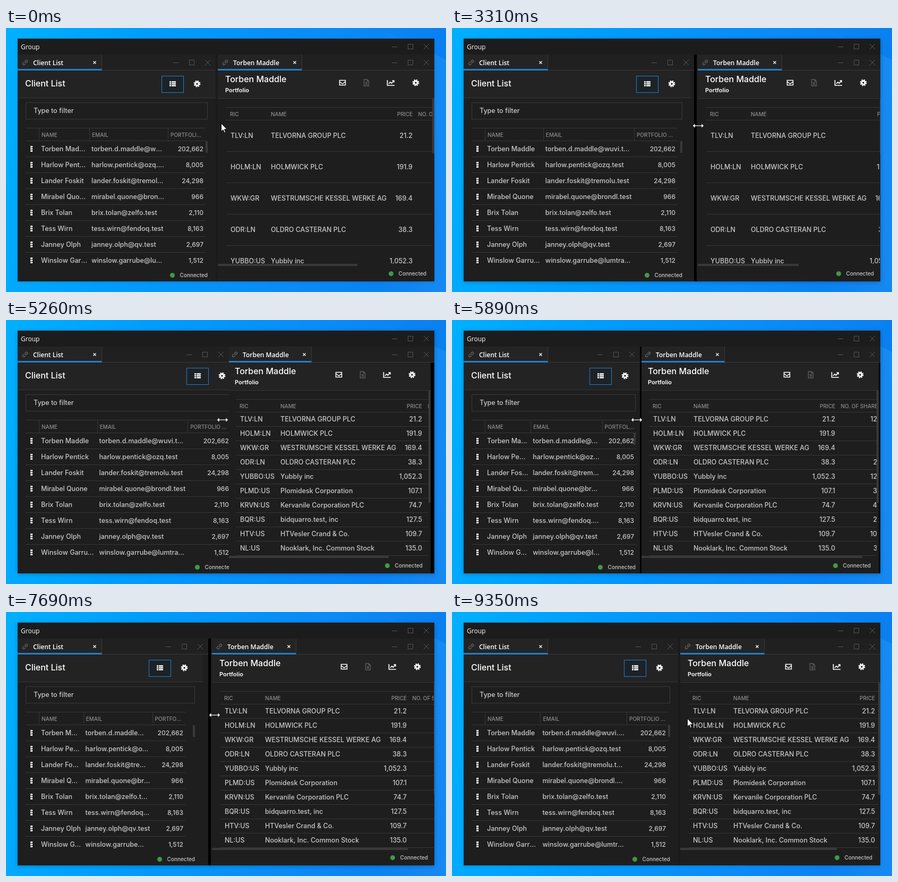
An HTML page that plays this animation: 829x497 px, repeating every 9.75 s.

```html
<!DOCTYPE html>
<html lang="en">
<head>
<meta charset="utf-8">
<title>Resizable panes</title>
<style>
html, body { margin: 0; width: 100%; height: 100%; overflow: hidden; }
body { position: relative; background: linear-gradient(100deg, #00b0ff, #009dfc 30%, #0a8cf7 65%, #0a7cee); font: 500 12.5px Inter, sans-serif; color: #c9c9c9; }
div, svg, span.t { position: absolute; }
svg { overflow: visible; width: 1px; height: 1px; fill: none; stroke: #fff; }
.t { line-height: 20px; white-space: pre; }
.ui { font: 12px/20px "Open Sans", sans-serif; color: #fff; }
.b { font-weight: 600; }
.small { font-size: 10px; }
.head { font-size: 10px; color: #8d8d8d; }
.title { font-size: 16px; color: #fff; }
.sub { font-size: 11px; color: #fff; }
.num { font-size: 12px; text-align: right; }
#glow { right: 0; top: 0; width: 130px; height: 100%; background: linear-gradient(90deg, transparent, #2a9cf866); clip-path: polygon(0 0, 100% 12%, 100% 100%, 0 100%); }
#win { left: 22px; top: 20px; width: 785px; height: 457px; overflow: hidden; background: #1b1b1b; }
#layer { left: -22px; top: -20px; width: 829px; height: 497px; }
#group { left: 0; top: 20px; width: 829px; height: 30px; background: #1c1c1c; z-index: 1; }
.pane { top: 0; height: 477px; overflow: hidden; }
.bar { top: 50px; left: 0; right: 0; height: 29px; background: #202020; border-bottom: 1px solid #383838; }
.body { top: 80px; left: 0; right: 0; bottom: 0; background: #1e1e1e; }
.tab { top: 50px; width: 158px; height: 27px; background: #242424; border-right: 1px solid #383838; border-bottom: 3px solid #1f80d0; }
.top { top: 80px; left: 0; right: 0; background: #232323; border-bottom: 1px solid #363636; }
.filter { left: 37px; right: 15px; top: 140px; height: 30px; border: 1px solid #3b3b3b; }
.btn { right: 60px; top: 90px; width: 40px; height: 30px; border: 1px solid #1f80d0; background: #1d2226; }
.dot { width: 9px; height: 9px; border-radius: 50%; background: #3f9a45; }
.scroll { background: #393939; }
#left { left: 0; }
#leftBody { left: 0; top: 0; height: 477px; }
#clients { left: 37px; top: 188px; height: 262px; overflow: hidden; }
.row { position: static; box-sizing: border-box; height: 30px; line-height: 29px; border-bottom: 1px solid #363636; display: grid; grid-template-columns: 25px minmax(0, 30.25fr) minmax(0, 47.1fr) minmax(0, 22.6fr); }
.row > * { position: relative; overflow: hidden; text-overflow: ellipsis; white-space: nowrap; padding: 0 4px; }
.row.head { height: 25px; line-height: 24px; border-top: 1px solid #363636; }
.row.head > * + * { border-left: 1px solid #363636; }
.row i { margin: 9px 0 0 9px; padding: 0; width: 4px; height: 11px; background: repeating-linear-gradient(#fff 0 3px, transparent 3px 4px); }
#right { background: #000; }
#rightBody { top: 0; height: 477px; box-shadow: -4px 0 #1e1e1e; }
#holder { left: 0; right: 4px; height: 311px; overflow: hidden; }
#shares { left: 16px; top: 16px; width: 456px; }
.share { position: relative; border-bottom: 1px solid #363636; box-sizing: border-box; }
.share span { position: absolute; top: 50%; margin-top: -10px; line-height: 20px; white-space: pre; }
.share.head { height: 25px; border-top: 1px solid #363636; }
</style>
</head>
<body>
<div id="glow"></div>
<div id="win"><div id="layer">
  <div id="group"></div>
  <div id="left" class="pane"></div>
  <div id="right" class="pane"></div>
</div></div>
<svg id="cursor" style="stroke:#000;fill:#fff"><path></path></svg>
<script>
const $ = id => document.getElementById(id);
const text = (x, y, s, cls = '', side = 'left') =>
  `<span class="t ${cls}" style="${side}:${x}px;top:${y - 10}px">${s}</span>`;
const svg = (x, y, inner, side = 'left') =>
  `<svg style="${side}:${side === 'right' ? x - 1 : x}px;top:${y}px">${inner}</svg>`;
const path = (d, extra = '') => `<path d="${d}" ${extra}/>`;

const icons = {
  gear: '<circle r="3.2" stroke-width="3"/><circle r="5.4" stroke-width="2" stroke-dasharray="2.4 1.84"/>',
  list: [-3.5, 0, 3.5].map(y => path(`M-6 ${y}H-3M-2 ${y}H6`, 'stroke-width="2.7"')).join(''),
  mail: path('M-5.5-4.5H5.5V4.5H-5.5ZM-5.5-2L0 2 5.5-2', 'stroke-width="1.5"'),
  file: path('M-4.5-6H1.5L4.5-3V6H-4.5ZM1.5-6V-3H4.5M-2-1L2 4M2-1L-2 4', 'stroke="#5c5c5c" stroke-width="1.4"'),
  chart: path('M-6.5-5V5H7M-4 2L-1-1 1.5 1 6-4M2.5-4H6V-.5', 'stroke-width="1.7"'),
  link: path('M-1 1L2-2M-1-2L1-4A2 2 0 0 1 4-1L2 1M1 2L-1 4A2 2 0 0 1-4 1L-2-1', 'stroke="#8a8a8a"'),
  close: path('M-2.5-2.5L2.5 2.5M2.5-2.5L-2.5 2.5', 'stroke-width="1.3"'),
};
const controls = (y, right = 15) => svg(right, y,
  path('M-65 .5H-55M-34.5-4.5H-25.5V4.5H-34.5ZM-5-5L5 5M5-5L-5 5', 'stroke="#565656"'), 'right');
const tab = (x, s) => `<div class="tab" style="left:${x}px"></div>` +
  svg(x + 14, 65, icons.link) + text(x + 29, 65.5, s, 'ui b') + svg(x + 145, 65, icons.close);
const status = y => `<div class="dot" style="right:77px;top:${y - 4}px"></div>` +
  text(15, y, 'Connected', 'small', 'right');

const clients = [
  ['Torben Maddle', 'torben.d.maddle@wuvi.test', '202,662'],
  ['Harlow Pentick', 'harlow.pentick@ozq.test', '8,005'],
  ['Lander Foskit', 'lander.foskit@tremolu.test', '24,298'],
  ['Mirabel Quone', 'mirabel.quone@brondl.test', '966'],
  ['Brix Tolan', 'brix.tolan@zelfo.test', '2,110'],
  ['Tess Wirn', 'tess.wirn@fendoq.test', '8,163'],
  ['Janney Olph', 'janney.olph@qv.test', '2,697'],
  ['Winslow Garrube', 'winslow.garrube@lumtrask.test', '1,512'],
];
const shares = [
  ['TLV:LN', 'TELVORNA GROUP PLC', '21.2', 123],
  ['HOLM:LN', 'HOLMWICK PLC', '191.9', 2],
  ['WKW:GR', 'WESTRUMSCHE KESSEL WERKE AG', '169.4', 2],
  ['ODR:LN', 'OLDRO CASTERAN PLC', '38.3', 23],
  ['YUBBO:US', 'Yubbly inc', '1,052.3', 123],
  ['PLMD:US', 'Plomidesk Corporation', '107.1', 30],
  ['KRVN:US', 'Kervanile Corporation PLC', '74.7', 40],
  ['BQR:US', 'bidquarro.test, inc', '127.5', 20],
  ['HTV:US', 'HTVesler Crand &amp; Co.', '109.7', 100],
  ['NL:US', 'Nooklark, Inc. Common Stock', '135.0', 35],
];
const clientRow = ([name, mail, value]) =>
  `<div class="row"><i></i><span>${name}</span><span>${mail}</span><span class="num">${value}</span></div>`;
const shareRow = ([ric, name, price, count], cls = '') => `<div class="share ${cls}">
  <span style="left:${cls ? 7 : 8}px">${ric}</span><span style="left:84px">${name}</span>
  <span style="right:105px">${price}</span><span style="right:18px">${count}</span></div>`;

$('group').innerHTML = text(28, 16, 'Group', 'ui') + controls(15, 37);

$('left').innerHTML = `<div class="bar"></div><div class="body"></div>
  <div id="leftBody"><div class="top" style="height:51px"></div>
  ${text(36, 104, 'Client List', 'title')}
  <div class="btn"></div>${svg(81, 105, icons.list, 'right')}${svg(35, 105, icons.gear, 'right')}
  <div class="filter"></div>${text(52, 156, 'Type to filter')}
  <div id="clients"><div class="row head"><span></span><span>NAME</span><span>EMAIL</span><span>PORTFOLIO VALUE</span></div>
  ${clients.map(clientRow).join('')}</div>
  <div class="scroll" style="right:15px;top:213px;width:4px;height:22px"></div>${status(465)}</div>
  ${tab(22, 'Client List')}${controls(65)}`;

$('right').innerHTML = `<div class="bar"></div>
  <div id="rightBody"><div class="body"></div><div id="top" class="top"></div>
  ${tab(0, clients[0][0])}${text(14, 96, clients[0][0], 'title')}
  ${text(14, 117, 'Portfolio', 'sub b')}
  <div id="tools" style="right:0;width:0">${['mail', 'file', 'chart', 'gear']
    .map((name, i) => svg([173, 128, 82, 35][i], 103, icons[name], 'right')).join('')}</div>
  <div id="holder"><div id="shares">${shareRow(['RIC', 'NAME', 'PRICE', 'NO. OF SHARES'], 'head')}
  ${shares.map(row => shareRow(row)).join('')}</div></div>
  <div id="vScroll" class="scroll" style="right:0;width:4px"></div>
  <div id="hScroll" class="scroll" style="left:0;top:444px;height:4px"></div>${status(462)}</div>
  ${controls(65)}`;
const shareRows = [...document.querySelectorAll('.share:not(.head)')];

// Linear interpolation through [time, value] points
function track(points, t) {
  const i = points.findIndex(p => p[0] > t);
  if (i === 0) return points[0][1];
  if (i < 0) return points[points.length - 1][1];
  const [t0, a] = points[i - 1], [t1, b] = points[i];
  return a + (b - a) * (t - t0) / (t1 - t0);
}
const drag = [[2050, 397], [2250, 400], [2300, 401], [2390, 404.5], [2420, 408], [2470, 408],
  [2900, 430], [3400, 473], [3900, 519], [4230, 519], [4500, 504], [5040, 445], [5090, 444],
  [5180, 422], [5190, 418], [5210, 415], [5260, 409], [5700, 365], [6250, 319], [6880, 319],
  [7200, 334], [7470, 359], [7520, 373], [7610, 383], [7640, 386], [7690, 394], [8100, 415], [8550, 428]];
const approach = [[380, 405], [520, 400], [850, 400], [990, 396]];
const leave = [[8400, 0], [8800, 16]];
const height = [[380, 179], [520, 178], [850, 178], [990, 180], [2470, 181], [4150, 186],
  [5260, 188], [6900, 189], [7690, 194], [8800, 199], [9340, 199], [9350, 200]];
const split = t => Math.round(track(drag, t));

const ARROW = 'M.5.5V16L4 12.6 6.5 18.2 8.8 17.2 6.4 11.8H11.3Z';
const RESIZE = 'M-10.5 0L-6-4.5V-1H6V-4.5L10.5 0 6 4.5V1H-6V4.5Z';
const LOOP = 9750, STEP = 70;
const starts = [0, 380, 850, 1320, 2120, 4280, 6920, 9350];
const px = (id, props) => {
  for (const key in props) $(id).style[key] = props[key] + 'px';
};

function draw(now) {
  const real = now % LOOP;
  const start = starts.filter(s => s <= real).pop();
  const t = start + Math.floor((real - start) / STEP) * STEP;

  // Contents follow the dragged splitter with different delays
  const table = split(t - 220) - 2, inner = split(t - 170) - 2;
  const edge = split(t - 80) - 2, pane = split(t - 70) + 2;
  const x = split(t - 50) + 2, width = 807 - split(t - 80) - 2;
  const moving = split(t) !== split(t - 220);

  $('win').style.background = moving ? '#000' : '#1b1b1b';
  $('win').style.boxShadow = t >= 1320 && t < 8740
    ? '0 1px 7px rgba(0,0,0,.3)' : '0 1px 5px rgba(0,0,0,.2)';
  px('left', { width: edge });
  px('leftBody', { width: inner });
  px('clients', { width: table - 56 });

  // A narrow pane wraps its tools, which also makes the rows compact from then on
  const wrap = width < 328 ? 32 : 0;
  const tall = t < 3520;
  const full = tall ? 634 : 482;
  px('right', { left: pane, width: 807 - pane });
  px('rightBody', { left: x - pane, width });
  px('top', { height: 52 + wrap });
  px('tools', { top: wrap && 36 });
  px('holder', { top: 133 + wrap });
  px('vScroll', { top: 133 + wrap, height: tall ? 103 : 211 });
  px('hScroll', { width: width < full && !wrap ? width * width / full : 0 });
  shareRows.forEach(row => row.style.height = (tall ? 59 : 27) + 'px');

  const arrow = t < 920 || t >= 8880;
  const cx = t < 920 ? track(approach, t) : split(t) + track(leave, t) - 1;
  px('cursor', { left: Math.round(cx), top: Math.round(track(height, t)) });
  $('cursor').firstChild.setAttribute('d', arrow ? ARROW : RESIZE);
  $('cursor').style.strokeWidth = arrow ? 1 : .7;
}

const begin = performance.now();
(function tick() {
  draw(performance.now() - begin);
  requestAnimationFrame(tick);
})();
</script>
</body>
</html>
```
